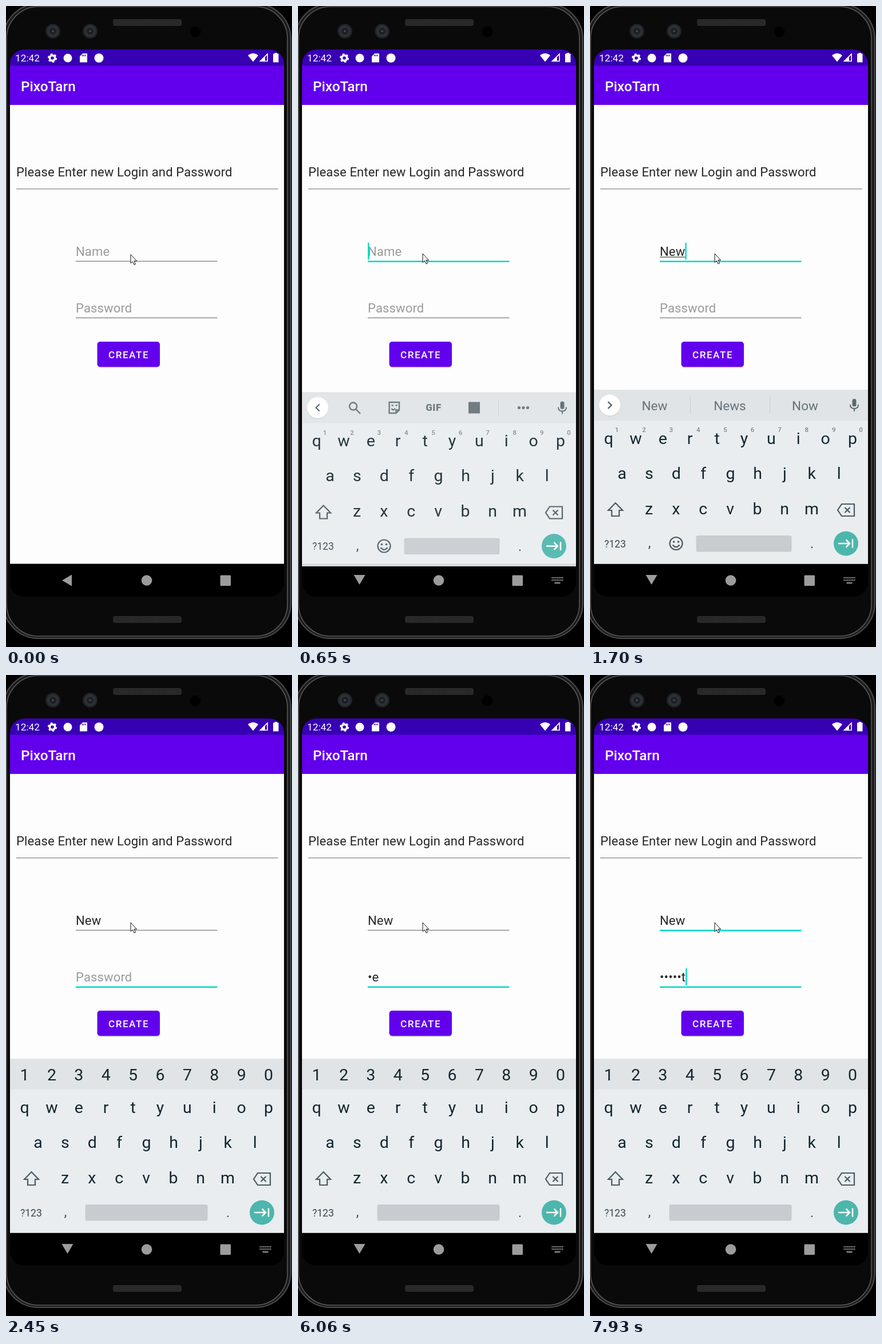
An HTML page for the animation above (8 s loop, 500 px wide and 1121 px high).

```html
<!DOCTYPE html>
<html lang="en">
<head>
<meta charset="utf-8">
<title>Login form</title>
<style>
html, body { margin: 0; height: 100%; overflow: hidden; background: #000; }
svg { display: block; width: 500px; height: 1121px; font-family: Roboto, sans-serif; }
text { white-space: pre; }
.field { font-size: 22px; letter-spacing: .15px; fill: #262626; }
.hint { fill: #9b9b9b; }
.mid { text-anchor: middle; }
.key { font-size: 28.5px; fill: #13262d; }
.sup { font-size: 11.5px; font-weight: 500; fill: #7d868b; }
.word { font-size: 22.5px; fill: #667177; }
.line { fill: none; stroke: #4b5a62; stroke-width: 2.2; }
.tool { fill: none; stroke: #667177; stroke-width: 2.4; }
.grey { fill: #9c9c9c; }
</style>
</head>
<body>
<svg viewBox="0 0 500 1121">
  <defs>
    <pattern id="mesh" width="3" height="3" patternUnits="userSpaceOnUse">
      <rect width="3" height="3" fill="#303030"/><circle cx="1.5" cy="1.5" r=".9" fill="#171717"/>
    </pattern>
    <radialGradient id="lens"><stop offset="0" stop-color="#555b62"/><stop offset=".25" stop-color="#14171b"/><stop offset=".6" stop-color="#30353b"/><stop offset="1" stop-color="#191c20"/></radialGradient>
    <clipPath id="screen"><rect x="7" y="76" width="479" height="957" rx="25"/></clipPath>
  </defs>

  <!-- phone body -->
  <rect width="500" height="1121"/>
  <rect x="-5" y="-4" width="503" height="1110" rx="62" fill="#1b1b1b" stroke="#4c4c4c" stroke-width="2"/>
  <rect x="1" y="1" width="491" height="1101" rx="56" fill="#0a0a0a" stroke="#5a5a5a" stroke-width="1.5"/>
  <g fill="url(#mesh)"><rect x="187" y="23" width="120" height="12" rx="4"/><rect x="187" y="1067" width="120" height="12" rx="4"/></g>
  <g fill="url(#lens)"><circle cx="82" cy="44" r="13"/><circle cx="147" cy="44" r="13"/></g>
  <circle cx="331" cy="45" r="9.500"/>

  <g clip-path="url(#screen)">
    <rect x="7" y="76" width="480" height="957"/>
    <rect x="7" y="173" width="480" height="802.500" fill="#fdfdfd"/>
    <rect x="7" y="76" width="480" height="29" fill="#3700b3"/>
    <rect x="7" y="104.500" width="480" height="68.500" fill="#6200ee"/>

    <!-- status bar -->
    <g fill="#fff">
      <text x="16" y="97" font-size="17.300">12:42</text>
      <g fill="none" stroke="#fff"><circle cx="81" cy="91" r="4.600" stroke-width="3.600"/><circle cx="81" cy="91" r="6.800" stroke-width="2.500" stroke-dasharray="3.560"/></g>
      <circle cx="108" cy="91" r="7.500"/>
      <path d="M134 83h8v15.500h-13V88z"/>
      <path d="M133.500 85v3m2.700-3v3m2.700-3v3" stroke="#3700b3" stroke-width="1.300"/>
      <circle cx="162.500" cy="91" r="8"/>
      <path d="M423 86.500Q432 79 441 86.500L432 97.500z"/>
      <path d="M457 84v12.500h-12.500z" fill="none" stroke="#fff" stroke-width="1.700"/><path d="M453 88v8h-8z"/>
      <path d="M469.500 82h4.500v1.500h2.500v15h-9.500v-15h2.500z"/>
      <text x="26" y="149" font-size="24.400" font-weight="500">PixoTarn</text>
    </g>

    <!-- form -->
    <text class="field" x="18" y="298">Please Enter new Login and Password</text>
    <rect x="18" y="319" width="457.500" height="1.700" fill="#a3a3a3"/>
    <g id="fields"></g>
    <rect x="160" y="588.500" width="109" height="44" rx="5" fill="#bbb"/>
    <rect x="159.500" y="587" width="109.500" height="44" rx="5" fill="#6200ee"/>
    <text x="179" y="616" font-size="17.100" font-weight="500" letter-spacing="1.530" fill="#fff">CREATE</text>

    <!-- navigation bar -->
    <g class="grey">
      <path id="back" d="M98 1004.500L115 994.500V1014.500z"/>
      <circle cx="246" cy="1004.500" r="9.300"/>
      <rect x="374.500" y="995.500" width="18.500" height="18.500" rx="1.500"/>
      <g id="ime" fill="none" stroke="#9c9c9c" stroke-width="2">
        <path d="M443.500 1000h20m-20 4h20" stroke-dasharray="2 1"/><path d="M448.500 1009h10"/>
      </g>
    </g>

    <g id="keyboard">
      <rect x="7" y="671" width="480" height="304.500" fill="#e9edf0"/>
      <rect x="7" y="671" width="480" height="54" fill="#e0e4e7"/>
      <g id="keys"></g>
      <path class="line" d="M44.500 869L57 882H51V892H38V882H32z"/>
      <path class="line" d="M440 871H462V892H440L433 881.500zM445.500 877l9 9m0-9l-9 9"/>
      <text x="25" y="946.500" font-size="17.500" fill="#37474f">?123</text>
      <text class="mid" x="104" y="947" font-size="23" fill="#37474f">,</text>
      <text class="mid" x="388" y="948" font-size="23" fill="#37474f">.</text>
      <rect id="space" y="926" height="28.500" rx="3" fill="#c8ccd0"/>
      <circle cx="447.500" cy="940" r="21.500" fill="#4db6ac"/>
      <path d="M434 940H454M447.500 933.500L454 940L447.500 946.500M459 932.500V947.500" fill="none" stroke="#fff" stroke-width="2.500"/>
      <g id="plain">
        <g class="line"><circle cx="150.500" cy="940" r="11"/><path d="M144.500 942.500Q150.500 950 156.500 942.500"/></g>
        <g fill="#4b5a62"><circle cx="146.500" cy="937" r="1.800"/><circle cx="154.500" cy="937" r="1.800"/></g>
        <circle cx="34.500" cy="699.500" r="18.500" fill="#cdd1d4"/><circle cx="34.500" cy="698" r="18.500" fill="#fff"/>
        <path id="chevron" class="line" d="M37.500 692L31.500 698L37.500 704"/>
        <rect x="458.500" y="687" width="7" height="13.500" rx="3.500" fill="#5c686e"/>
        <path d="M455 697Q455 704 462 704T469 697M462 704V709" fill="none" stroke="#5c686e" stroke-width="2"/>
      </g>
      <g id="tools">
        <g class="tool">
          <circle cx="96.500" cy="695.500" r="6.500"/><path d="M101 700.500L109 708.500"/>
          <path d="M162 688.500H177V702L171.500 707.500H159.500V688.500H162M171.500 707V702H176.500M163.500 699.500Q166.500 704 170 699.500M163.500 694h3m4 0h3"/>
        </g>
        <text class="mid" x="237" y="703.500" font-size="17" font-weight="900" letter-spacing=".5" fill="#667177">GIF</text>
        <rect x="298" y="688" width="20" height="20" fill="#667177"/>
        <rect x="350" y="684" width="1.200" height="28" fill="#cbd0d3"/>
        <g fill="#667177"><circle cx="386.500" cy="698" r="2.600"/><circle cx="394" cy="698" r="2.600"/><circle cx="401.500" cy="698" r="2.600"/></g>
      </g>
      <g id="words"></g>
    </g>
  </g>
  <path id="pointer" d="M0 0V15.500L3.500 12.500L6 18L8.500 17L6 11.500H10.500z" fill="#fff" stroke="#111"/>
</svg>
<script>
const LOOP = 8000;
const $ = id => document.getElementById(id);
const show = (el, on) => el.setAttribute('visibility', on ? 'inherit' : 'hidden');
const label = (cls, x, y, s) => `<text class="mid ${cls}" x="${x}" y="${y}">${s}</text>`;
const row = (chars, x, y, cls = 'key') =>
  [...chars].map((c, i) => label(cls, x + i * 47.4, y, c)).join('');

$('keys').innerHTML = row('qwertyuiop', 32.5, 765.5) + row('asdfghjkl', 56, 826.5) + row('zxcvbnm', 103, 888.5) +
  `<g id="digits">${row('1234567890', 32.5, 709)}</g><g id="sups">${row('1234567890', 47, 745, 'sup')}</g>`;
$('words').innerHTML = [113, 244.5, 376].map(x => label('word', x, 707, '')).join('') +
  '<path d="M175.500 683V713M314.500 683V713" stroke="#cbd0d3" stroke-width="1.200"/>';
const words = [...$('words').querySelectorAll('text')];

function makeField(hint, baseline) {
  const group = document.createElementNS('http://www.w3.org/2000/svg', 'g');
  group.innerHTML = `<rect x="122" width="247.500"/><text x="122" y="${baseline}"></text>
    <rect x="122" y="${baseline + 1.5}" height="1.200" fill="#444"/>
    <rect y="${baseline - 23}" width="2.400" height="29.500" fill="#03dac5"/>`;
  $('fields').append(group);
  const [line, text, composing, caret] = group.children;
  return (value, active, caretOn, composed) => {
    line.setAttribute('y', baseline + (active ? 8.5 : 8.8));
    line.setAttribute('height', active ? 2.5 : 1.2);
    line.setAttribute('fill', active ? '#03dac5' : '#777');
    text.textContent = value || hint;
    text.setAttribute('class', value ? 'field' : 'field hint');
    const width = value ? text.getComputedTextLength() : 0;
    composing.setAttribute('width', composed ? width : 0);
    caret.setAttribute('x', 122 + width);
    show(caret, caretOn);
  };
}
const drawName = makeField('Name', 437), drawPassword = makeField('Password', 536);

const countUntil = (times, t) => times.filter(at => at <= t).length;
const nameTyping = [1330, 1580, 1700];
const passwordTyping = [5160, 5560, 6180, 6700, 6850, 6970];
const nameBlink = [410, 930, 1330, 2080];
const passwordBlink = [2080, 2450, 2980, 3480, 4010, 4510, 5010, 6060, 6180, 6580, 6700, 7370, 7930];
const suggestions = [['', '', ''], ['N', 'No', 'Not'], ['Ne', 'New', 'Need'], ['New', 'News', 'Now']];

function render(t) {
  const typed = countUntil(nameTyping, t), chars = countUntil(passwordTyping, t);
  const secure = t >= 2200;
  const lit = times => countUntil(times, t) % 2 === 1;
  drawName('New'.slice(0, typed), t >= 290 && t < 2080 || t >= 7930, lit(nameBlink), t < 2080);
  drawPassword(chars ? '•'.repeat(chars - 1) + 'newest'[chars - 1] : '', t >= 2080, lit(passwordBlink));

  show($('keyboard'), t >= 650);
  $('keyboard').setAttribute('transform', `translate(0 ${t < 770 ? 4.5 : 0})`);
  $('keyboard').setAttribute('opacity', t < 770 ? .92 : 1);
  show($('digits'), secure);
  show($('sups'), !secure);
  show($('plain'), !secure);
  show($('tools'), !typed);
  show($('words'), typed && !secure);
  words.forEach((el, i) => el.textContent = suggestions[typed][i]);
  $('chevron').setAttribute('transform', typed ? 'rotate(180 34.500 698)' : '');
  $('space').setAttribute('x', secure ? 138.5 : 185.5);
  $('space').setAttribute('width', secure ? 214 : 167);

  $('back').setAttribute('transform', `rotate(${t < 530 ? 0 : t < 650 ? -12 : -90} 106.500 1003.500)`);
  show($('ime'), t >= 530);
  $('pointer').setAttribute('transform', `translate(218 ${t < 150 ? 434.5 : 433})`);
}

function tick() {
  render(performance.now() % LOOP);
  requestAnimationFrame(tick);
}
tick();
</script>
</body>
</html>
```
